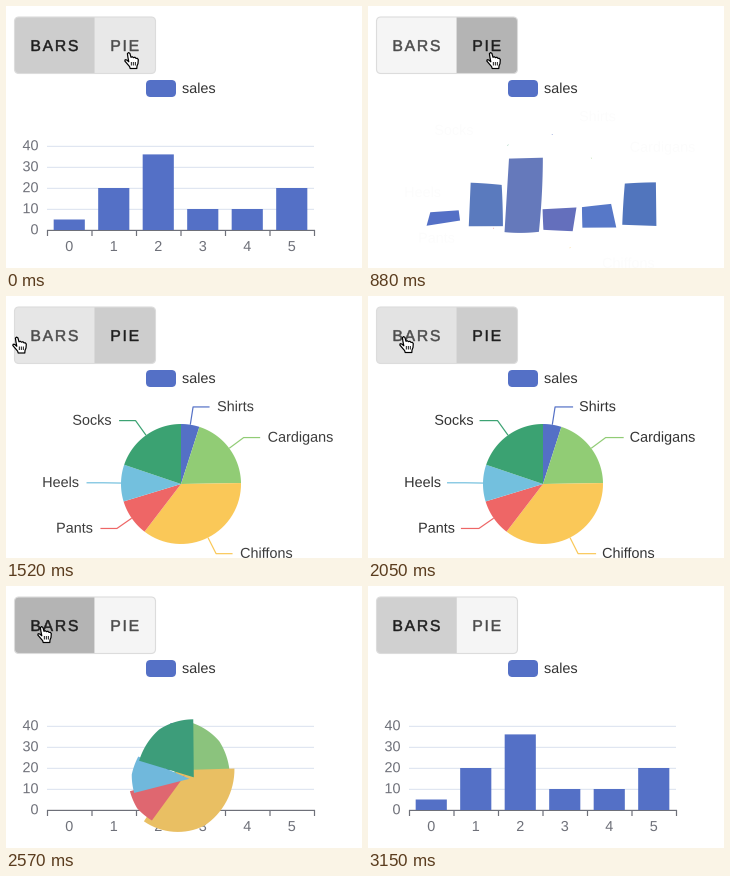
Recreate the animation shown at these times as a matplotlib script. Size 356 by 262 pixels, loop 3810 ms.

```python
import numpy as np
import matplotlib.pyplot as plt
from matplotlib.animation import FuncAnimation
from matplotlib.colors import to_rgb
from matplotlib.patches import Circle, FancyBboxPatch, PathPatch, Polygon, Rectangle
from matplotlib.textpath import TextPath
from matplotlib.transforms import Affine2D

plt.rcParams["path.snap"] = False

W, H, DPI = 356, 262, 100
PX = 72 / DPI
LOOP, INTERVAL = 3810, 30
FONT = dict(family="Liberation Sans")

NAMES = ["Shirts", "Cardigans", "Chiffons", "Pants", "Heels", "Socks"]
SALES = np.array([5, 20, 36, 10, 10, 20])
COLORS = [np.array(to_rgb(c)) for c in
          ("#5470c6", "#91cc75", "#fac858", "#ee6666", "#73c0de", "#3ba272")]
BLUE = COLORS[0]
INK, AXIS = "#333333", "#6e7079"

LEFT, RIGHT, BASE, UNIT = 41, 308, 224, 2.1
CX, CY, R, LEG = 175, 188, 60, 18
# rectangle corner that becomes the tip of each slice (0 = top left, clockwise)
TIP_CORNER = [3, 3, 0, 1, 2, 2]


def ticks(start, count, gap):
    """Screen refresh times, in whole hundredths of a second."""
    return 10 * np.floor((start + gap * np.arange(count)) / 10)


STEPS = np.concatenate([
    [0], ticks(650, 10, 58.6), ticks(1230, 10, 58.6), [2050],
    ticks(2350, 10, 57.3), ticks(2920, 5, 57.5)])
TO_PIE, TO_BARS, MORPH, LABELS = 732, 2424, 500, 1000
HIDE_CURSOR = 3140

CURSOR = np.array([
    (1080, 118, 46), (1170, 92, 46), (1290, 45, 44), (1400, 16, 42),
    (1520, 6, 40.5), (1580, 6, 40.5), (1750, 30, 40), (2049, 30, 40),
    (2050, 31, 40), (2980, 31, 40), (3090, 34, 32)])
BARS_FILL = [(650, 205), (735, 245), (1170, 245), (1400, 232), (1750, 227),
             (2350, 227), (2570, 208), (2750, 224), (2860, 208)]
PIE_FILL = [(650, 232), (880, 208), (1060, 224), (1170, 205), (2350, 205),
            (2430, 245)]

fig = plt.figure(figsize=(W / DPI, H / DPI), dpi=DPI, facecolor="white")
ax = fig.add_axes([0, 0, 1, 1])
ax.set_xlim(0, W)
ax.set_ylim(H, 0)
ax.axis("off")


def advance(s, size):
    def ink(text):
        return TextPath((0, 0), text, size=size, prop=FONT).get_extents().width
    return ink("H" + s + "H") - ink("HH")


def put_text(x, y, s, color, size=14.4, align=0.0, weight=0.0, z=5):
    """Text with its baseline at y; align 0 is left, 0.5 centre, 1 right."""
    x -= align * advance(s, size)
    path = TextPath((0, 0), s, size=size, prop=FONT)
    path = path.transformed(Affine2D().scale(1, -1).translate(x, y))
    return ax.add_patch(PathPatch(path, fc=color, ec=color,
                                  lw=weight * PX, zorder=z))


def put_line(xs, ys, color, width=1.2, z=3):
    return ax.plot(xs, ys, color=color, lw=width * PX, zorder=z,
                   solid_capstyle="butt")[0]


def spaced_text(x, y, s, size=15.7, gap=1.75):
    letters = []
    for ch in s:
        letters.append(put_text(x, y, ch, INK, size, weight=0.45, z=6))
        x += advance(ch, size) + gap
    return letters


def ease(p):
    p = np.clip(p, 0, 1)
    return 4 * p ** 3 if p < 0.5 else 1 - 4 * (1 - p) ** 3


def polar(angle, radius):
    return np.stack([CX + radius * np.sin(angle),
                     CY - radius * np.cos(angle)], axis=-1)


def sides(corners, n=16):
    """Closed outline of straight sides, n points on each."""
    u = np.linspace(0, 1, n, endpoint=False)[:, None]
    return np.concatenate([a + (b - a) * u
                           for a, b in zip(corners, np.roll(corners, -1, 0))])


def bar_outline(i, n=16):
    step = (RIGHT - LEFT) / 6
    x0 = LEFT + step * (i + 0.15)
    x1, y0 = x0 + step * 0.7, BASE - UNIT * SALES[i]
    corners = np.array([(x0, y0), (x1, y0), (x1, BASE), (x0, BASE)])
    return sides(np.roll(corners, -TIP_CORNER[i], axis=0), n)


def slice_outline(a, b, n=16):
    u = np.linspace(0, 1, n, endpoint=False)[:, None]
    tip, start, end = np.array([CX, CY]), polar(a, R), polar(b, R)
    arc = polar(np.linspace(a, b, 2 * n, endpoint=False), R)
    return np.concatenate([tip + (start - tip) * u, arc, end + (tip - end) * u])


def centroid(pts):
    nxt = np.roll(pts, -1, axis=0)
    cross = pts[:, 0] * nxt[:, 1] - pts[:, 1] * nxt[:, 0]
    return ((pts + nxt) * cross[:, None]).sum(axis=0) / (3 * cross.sum())


def turn(pts, angle):
    c, s = np.cos(angle), np.sin(angle)
    return pts @ np.array([[c, s], [-s, c]])


class Morph:
    """Blend of two outlines that also turns by the best fitting angle."""

    def __init__(self, start, end):
        self.c0, self.c1 = centroid(start), centroid(end)
        self.start, end = start - self.c0, end - self.c1
        angles = np.radians(np.arange(-90, 91, 18))
        self.angle = min(
            angles, key=lambda a: ((turn(end, a) - self.start) ** 2).sum())
        self.end = turn(end, self.angle)

    def at(self, e):
        pts = self.start * (1 - e) + self.end * e
        return turn(pts, -self.angle * e) + self.c0 * (1 - e) + self.c1 * e


def partial(points, share):
    """First part of a polyline, by share of its length."""
    d = np.r_[0, np.cumsum(np.hypot(*np.diff(points, axis=0).T))]
    at = np.union1d(d[d < share * d[-1]], [share * d[-1]])
    return np.interp(at, d, points[:, 0]), np.interp(at, d, points[:, 1])


# toggle buttons
def group_box(**style):
    return ax.add_patch(FancyBboxPatch(
        (8.5, 11), 141, 56.5, boxstyle="round,pad=0,rounding_size=4.5", **style))


clip = group_box(fc="none", ec="none")
bars_fill = ax.add_patch(Rectangle((8, 10), 80, 59, lw=0))
pie_fill = ax.add_patch(Rectangle((88, 10), 62, 59, lw=0))
ripple = ax.add_patch(Circle((0, 0), 18, fc="black", lw=0, zorder=2))
for part in (bars_fill, pie_fill, ripple):
    part.set_clip_path(clip)
put_line([88.5, 88.5], [11, 67.5], "#d9d9d9", 1, z=4)
group_box(fc="none", ec="#dcdcdc", lw=1.1 * PX, zorder=4)
bars_text = spaced_text(24.4, 45, "BARS")
pie_text = spaced_text(104.3, 45, "PIE")

# legend
ax.add_patch(FancyBboxPatch((140, 74), 30, 17, fc=BLUE, lw=0,
                            boxstyle="round,pad=0,rounding_size=4.5"))
put_text(176, 87, "sales", INK)

# axes of the bar chart
grid = []
for value in (0, 10, 20, 30, 40):
    y = BASE - UNIT * value
    grid.append(put_text(32.5, y + 4.2, str(value), AXIS, align=1, z=3))
    if value:
        grid.append(put_line([LEFT, RIGHT], [y + 0.4] * 2, "#e0e6f1", z=1))
grid.append(put_line([LEFT, RIGHT + 1], [BASE + 0.4] * 2, AXIS))
for i, x in enumerate(np.linspace(LEFT, RIGHT, 7)):
    grid.append(put_line([x + 0.5] * 2, [BASE, BASE + 6], AXIS))
    if i < 6:
        grid.append(put_text(x + 22.25, 245, str(i), AXIS, align=0.5, z=3))

# shapes that are both bars and slices, with their labels
edges = np.r_[0, np.cumsum(SALES)] / SALES.sum() * 2 * np.pi
morphs, shapes, leaders, legs, labels = [], [], [], [], []
for i, name in enumerate(NAMES):
    a, b = edges[i], edges[i + 1]
    mid = (a + b) / 2
    morphs.append(Morph(bar_outline(i), slice_outline(a, b)))
    shapes.append(ax.add_patch(Polygon(morphs[i].at(0), lw=0, zorder=7 + i / 10)))
    side = 1 if mid < np.pi else -1
    rim, elbow = polar(mid, R), polar(mid, R + LEG)
    tail = elbow + [side * LEG, 0]
    leaders.append(np.array([rim, elbow, tail]))
    legs.append(put_line([], [], COLORS[i], 1.2, z=6))
    labels.append(put_text(tail[0] + side * 6, tail[1] + 4.2, name, INK,
                           align=0 if side > 0 else 1, z=6))

# hand pointer
HAND = np.array([
    (3.4, 1.6), (4.6, 0.6), (5.9, 1.4), (7, 5.3), (8.3, 4.7), (9.5, 5.7),
    (10.9, 5.2), (12, 6.4), (13.3, 6.3), (14.3, 7.6), (14, 11.5), (13, 14),
    (12.8, 16.5), (6.2, 16.5), (5.6, 14.6), (3.2, 11.8), (0.8, 9),
    (1.2, 7.7), (2.8, 8), (4.8, 9.8), (3.9, 5.2)])
hand = ax.add_patch(Polygon(HAND, fc="white", ec="black", lw=1.2 * PX,
                            joinstyle="round", zorder=10))
creases = [put_line([], [], "black", 0.9, z=11) for _ in range(3)]


def draw_buttons(t):
    for fill, keys, text, active in (
            (bars_fill, BARS_FILL, bars_text, t < 650 or t >= TO_BARS),
            (pie_fill, PIE_FILL, pie_text, TO_PIE <= t < TO_BARS)):
        fill.set_facecolor([np.interp(t, *zip(*keys)) / 255] * 3)
        for letter in text:
            letter.set_color("#1e1e1e" if active else "#4c4c4c")

    on_bars = t >= 2350
    dt = t - (2350 if on_bars else 650)
    press, centre = (((39, 40), (48, 39)) if on_bars
                     else ((124, 47), (119, 39)))
    grow = np.clip(dt / 200, 0, 1)
    ripple.center = tuple(np.array(press) * (1 - grow) + np.array(centre) * grow)
    ripple.set_radius(18 + 50 * grow)
    fade = np.clip((dt - 235) / 170, 0, 1)
    ripple.set_alpha(0.135 * (1 - fade) if dt >= 0 else 0)
    bars_fill.set_zorder(1 if on_bars else 3)
    pie_fill.set_zorder(3 if on_bars else 1)


def draw_chart(t):
    pie_mode = TO_PIE <= t < TO_BARS
    e = (ease((t - TO_PIE) / MORPH) if t < TO_BARS
         else 1 - ease((t - TO_BARS) / MORPH))
    shown = ease((t - TO_PIE - 8) / LABELS)
    for part in grid:
        part.set_visible(not pie_mode)
    for i, shape in enumerate(shapes):
        shape.set_xy(morphs[i].at(e))
        shape.set_facecolor(BLUE * (1 - e) + COLORS[i] * e)
        legs[i].set_visible(pie_mode)
        legs[i].set_data(*partial(leaders[i], shown))
        labels[i].set_visible(pie_mode)
        labels[i].set_alpha(shown)


def draw_pointer(t):
    x, y = (np.interp(t, CURSOR[:, 0], CURSOR[:, k]) for k in (1, 2))
    hand.set_xy(HAND + [x, y])
    hand.set_visible(t < HIDE_CURSOR)
    for k, crease in enumerate(creases):
        crease.set_data([x + 7.3 + 2 * k] * 2, [y + 10, y + 13.5])
        crease.set_visible(t < HIDE_CURSOR)


def draw(frame):
    now = (frame + 1) * INTERVAL - 1
    t = STEPS[np.searchsorted(STEPS, now, side="right") - 1]
    draw_buttons(t)
    draw_chart(t)
    draw_pointer(t)
    return []


anim = FuncAnimation(fig, draw, frames=LOOP // INTERVAL, interval=INTERVAL,
                     init_func=lambda: draw(0), repeat=True, repeat_delay=0,
                     blit=False)
plt.show()
```
